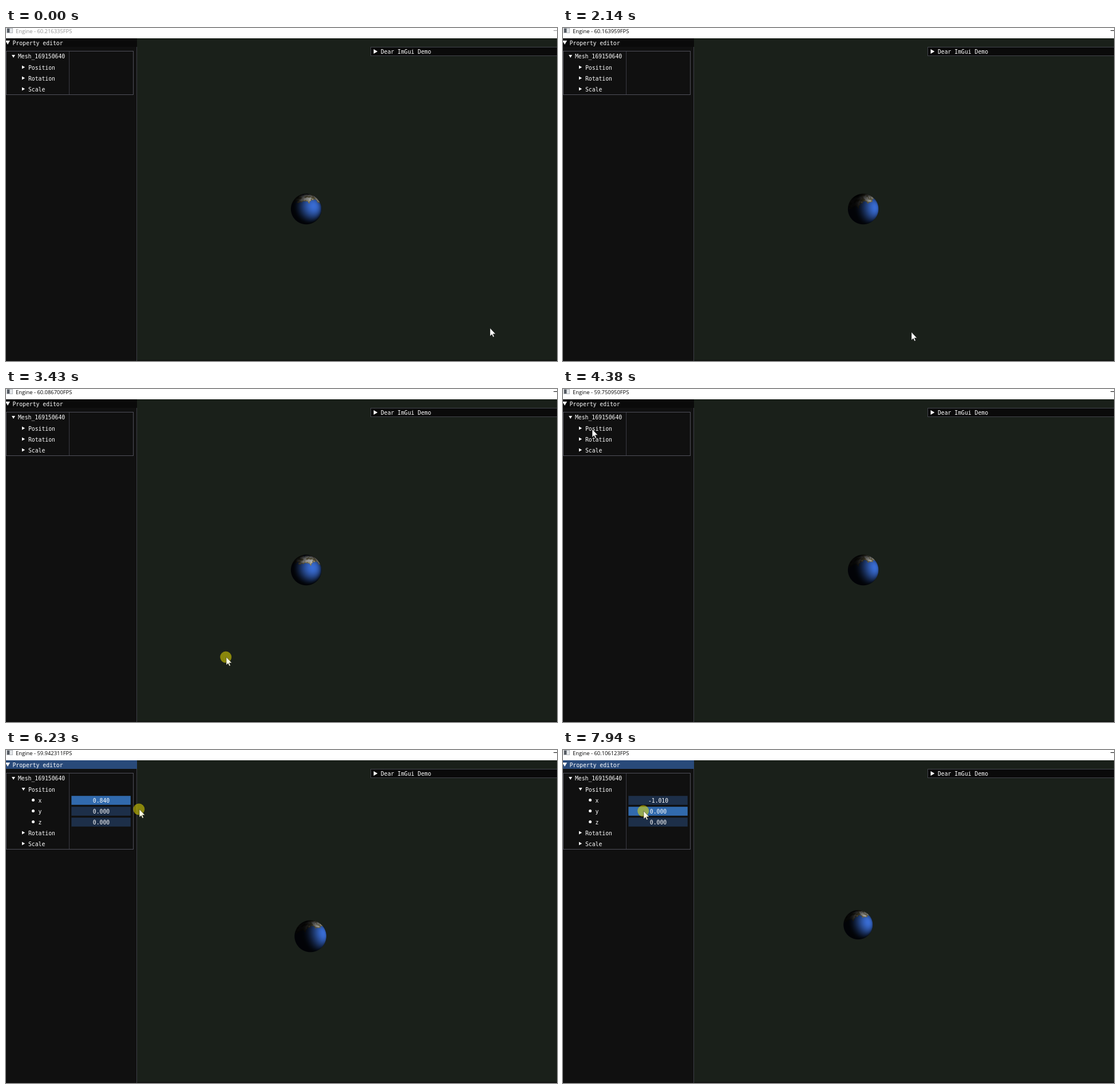
These frames come from a looping animation (963x582 px, 8 s). An HTML page with a canvas:

```html
<!DOCTYPE html>
<html lang="en">
<head>
<meta charset="utf-8">
<title>Engine property editor</title>
<style>
html, body { margin: 0; width: 100%; height: 100%; overflow: hidden; background: #1a201a; }
canvas { display: block; }
</style>
</head>
<body>
<canvas id="stage" width="963" height="582"></canvas>
<script>
const LOOP = 8000;
const ACTIVATE = 330, EXPAND = 4560, DRAG_START = 5800, DRAG_END = 7540, GRAB_Y = 7860;
const ctx = document.getElementById('stage').getContext('2d');
const MONO = '9.75px "DejaVu Sans Mono", monospace';
const SANS = '9.4px "Open Sans", "Noto Sans", sans-serif';

// Turning points of the pointer: time, x, y.
const pointerPath = [
  [0, 846, 525], [ACTIVATE, 673, 435], [1000, 513, 437], [1780, 770, 148],
  [2140, 609, 532], [2580, 842, 310], [3140, 110, 392], [3430, 385, 469],
  [3680, 565, 400], [4400, 50, 70], [5280, 115, 90], [DRAG_START, 149, 88],
  [6698, 328, 122], [DRAG_END, 48, 100], [7900, 141, 107]
];
// Orbit after each drag: time, pitch, roll (degrees), sideways light.
const orbit = [
  [ACTIVATE, 0, 0, 0.48], [1000, 43, 3, 0.62], [1830, 14, 24, 0.8],
  [3430, 4, -3, 0.42], [3720, 2, 15, 0.75]
];
const presses = [[ACTIVATE, 1830], [2230, 3720], [4480, EXPAND], [5700, DRAG_END], [GRAB_Y, LOOP]];
const fpsReadings = ['60.216335', '60.027754', '60.163959', '60.086700',
  '59.750950', '59.942311', '60.106123'];

const clamp = (v, lo = 0, hi = 1) => Math.max(lo, Math.min(hi, v));
const step = (lo, hi, v) => { const f = clamp((v - lo) / (hi - lo)); return f * f * (3 - 2 * f); };
const mix = (a, b, f) => a + (b - a) * f;

function sample(keys, t) {
  const next = keys.findIndex(k => k[0] > t);
  if (next < 0) return keys[keys.length - 1].slice(1);
  if (next === 0) return keys[0].slice(1);
  const a = keys[next - 1], b = keys[next];
  const f = step(a[0], b[0], t);
  return a.slice(1).map((v, i) => mix(v, b[i + 1], f));
}

// The dragged value follows the pointer, one hundredth per pixel.
function positionX(t) {
  if (t < DRAG_START) return 0;
  const [x] = sample(pointerPath, Math.min(t, DRAG_END));
  return Math.round(x - 149) / 100;
}

function hash(x, y, z) {
  const s = Math.sin(x * 127.1 + y * 311.7 + z * 74.7) * 43758.5453;
  return s - Math.floor(s);
}
function noise(x, y, z) {
  const i = Math.floor(x), j = Math.floor(y), k = Math.floor(z);
  const u = step(0, 1, x - i), v = step(0, 1, y - j), w = step(0, 1, z - k);
  const row = (b, c) => mix(hash(i, b, c), hash(i + 1, b, c), u);
  const slab = c => mix(row(j, c), row(j + 1, c), v);
  return mix(slab(k), slab(k + 1), w);
}

function rect(x, y, w, h, color) {
  ctx.fillStyle = color;
  ctx.fillRect(x, y, w, h);
}
function frame(x, y, w, h, color) {
  ctx.strokeStyle = color;
  ctx.lineWidth = 1;
  ctx.strokeRect(x + 0.5, y + 0.5, w - 1, h - 1);
}
function text(s, x, y, color = '#fff', font = MONO, align = 'left') {
  ctx.font = font;
  ctx.fillStyle = color;
  ctx.textAlign = align;
  ctx.fillText(s, x, y);
}
function poly(points, color) {
  ctx.beginPath();
  points.forEach(([x, y]) => ctx.lineTo(x, y));
  ctx.closePath();
  ctx.fillStyle = color;
  ctx.fill();
}
function disc(x, y, r, color) {
  ctx.beginPath();
  ctx.arc(x, y, r, 0, Math.PI * 2);
  ctx.fillStyle = color;
  ctx.fill();
}
function arrow(x, y, size, open) {
  const h = size * 0.86;
  poly(open ? [[x - size, y - h], [x + size, y - h], [x, y + h]]
            : [[x - h, y - size], [x + h, y], [x - h, y + size]], '#fff');
}

const SIZE = 72;
const ball = document.createElement('canvas');
ball.width = ball.height = SIZE;
const ballCtx = ball.getContext('2d');
const pixels = ballCtx.createImageData(SIZE, SIZE);

function surface(x, y, z, lat) {
  const fine = noise(x * 9 + 20, y * 9 + 20, z * 9 + 20);
  const wide = noise(x * 4 + 50, y * 4 + 50, z * 4 + 50);
  const edge = lat + (wide - 0.5) * 18 + (fine - 0.5) * 16;
  const polar = step(66, 80, edge);
  const land = step(27, 31, edge) * (1 - polar);
  const cloud = step(0.28, 0.62, wide * 0.4 + fine * 0.6) * step(29, 40, edge);
  const sea = [mix(60, 22, polar), mix(114, 36, polar), mix(222, 75, polar)];
  const soil = [mix(136, 232, cloud), mix(126, 232, cloud), mix(84, 228, cloud)];
  return sea.map((c, i) => mix(c, soil[i], land));
}

function drawGlobe(x0) {
  const cx = 524.7 + 8.8 * x0.value, cy = 316.4 + 10.8 * x0.value, r = 26.8 + 1.2 * x0.value;
  const [tilt, lean, side] = x0.orbit;
  const [pitch, roll, yaw] = [tilt, lean, side * 100].map(d => d * Math.PI / 180);
  const lx = side + 0.07 * x0.value, ly = 0.2 - tilt / 140;
  const lz = Math.sqrt(Math.max(0, 1 - lx * lx - ly * ly));
  const left = Math.round(cx - SIZE / 2), top = Math.round(cy - SIZE / 2);
  const cp = Math.cos(pitch), sp = Math.sin(pitch);
  const cr = Math.cos(roll), sr = Math.sin(roll);
  const cw = Math.cos(yaw), sw = Math.sin(yaw);
  for (let j = 0; j < SIZE; j++) for (let i = 0; i < SIZE; i++) {
    const at = (j * SIZE + i) * 4;
    let x = (left + i + 0.5 - cx) / r, y = (cy - top - j - 0.5) / r;
    const d = Math.hypot(x, y);
    const cover = clamp((1 - d) * r + 0.5);
    pixels.data[at + 3] = cover * 255;
    if (!cover) continue;
    if (d > 1) { x /= d; y /= d; }
    const z = Math.sqrt(Math.max(0, 1 - x * x - y * y));
    const light = 0.03 + 0.92 * Math.pow(Math.max(0, x * lx + y * ly + z * lz), 2.4);
    const u = x * cr + y * sr, v = y * cr - x * sr;
    const py = v * cp + z * sp, pz = z * cp - v * sp;
    const lat = Math.asin(clamp(py, -1, 1)) * 180 / Math.PI;
    const color = surface(u * cw + pz * sw, py, pz * cw - u * sw, lat);
    for (let c = 0; c < 3; c++) pixels.data[at + c] = color[c] * light;
  }
  ballCtx.putImageData(pixels, 0, 0);
  ctx.drawImage(ball, left, top);
}

function drawTitle(t) {
  const ink = t < ACTIVATE ? '#929292' : '#000';
  rect(0, 0, 963, 18, '#fff');
  rect(1, 0, 11, 9, '#b4b8bd');
  rect(2, 1, 4, 7, '#555a62');
  rect(7, 1, 4, 7, '#e4e7ea');
  text(`Engine - ${fpsReadings[Math.round(t / 1250)]}FPS`, 17, 8.5, ink, SANS);
  rect(957, 4, 6, 1, ink);
}

function drawField(y, value, active, hover) {
  rect(114.4, y - 7.8, 103.4, 15.6, active ? '#316aad' : hover ? '#24466e' : '#1d2f49');
  text(value.toFixed(3), 166.5, y + 3.5, '#fff', MONO, 'center');
}

function drawPanel(t, mx, my, pressed, value) {
  const open = t >= EXPAND;
  rect(0, 18, 228, 564, '#101010');
  rect(0, 18, 229, 15, open ? '#294a7a' : '#0a0a0a');
  rect(228, 33, 1, 549, '#3c3e45');
  arrow(3, 25.5, 4, true);
  text('Property editor', 11.5, 29.5);

  const bottom = open ? 174 : 117;
  rect(110, 40, 1, bottom - 41, '#3b3b43');
  frame(0, 40, 223, bottom - 40, '#4f4f59');
  arrow(13, 49.5, 3, true);
  text('Mesh_169150640', 21, 53);

  const heading = (label, y, down) => {
    arrow(30.5, y - 0.5, 3, down);
    text(label, 39, y + 3.5);
  };
  heading('Position', 69, open);
  heading('Rotation', open ? 145 : 88, false);
  heading('Scale', open ? 164 : 107, false);
  if (!open) return;

  const active = !pressed ? -1 : t < DRAG_END ? 0 : 1;
  [value, 0, 0].forEach((v, i) => {
    const y = 88 + i * 19;
    const over = !pressed && mx > 117 && mx < 218 && Math.abs(my - y) < 8;
    disc(47.5, y - 0.5, 2.5, '#fff');
    text('xyz'[i], 56.5, y + 3.5);
    drawField(y, v, i === active, over);
  });
}

function drawDemo() {
  rect(637, 33, 326, 16, '#0a0a0a');
  frame(637, 33, 330, 16, '#41434a');
  arrow(646, 41, 4, false);
  text('Dear ImGui Demo', 655, 45);
}

function drawPointer(x, y, pressed) {
  if (pressed) disc(x - 0.8, y - 0.4, 10, 'rgba(240,228,0,.52)');
  const shape = [[0, 0], [0, 14], [3.2, 11], [5.3, 15.6], [7.3, 14.7], [5.2, 10.2], [9.6, 10.2]];
  poly(shape.map(([a, b]) => [x + a, y + b - 0.4]), pressed ? '#fffde4' : '#fff');
  ctx.strokeStyle = 'rgba(0,0,0,.7)';
  ctx.lineWidth = 0.6;
  ctx.stroke();
}

function draw(t) {
  const [mx, my] = sample(pointerPath, t);
  const value = positionX(t);
  const pressed = presses.some(([a, b]) => t >= a && t < b);
  rect(0, 0, 963, 582, '#1a201a');
  drawGlobe({ value, orbit: sample(orbit, t) });
  rect(229, 580, 734, 2, '#111411');
  drawPanel(t, mx, my, pressed, value);
  drawDemo();
  drawTitle(t);
  drawPointer(mx, my, pressed);
}

const start = performance.now();
function tick() {
  draw((performance.now() - start) % LOOP);
  requestAnimationFrame(tick);
}
tick();
</script>
</body>
</html>
```
